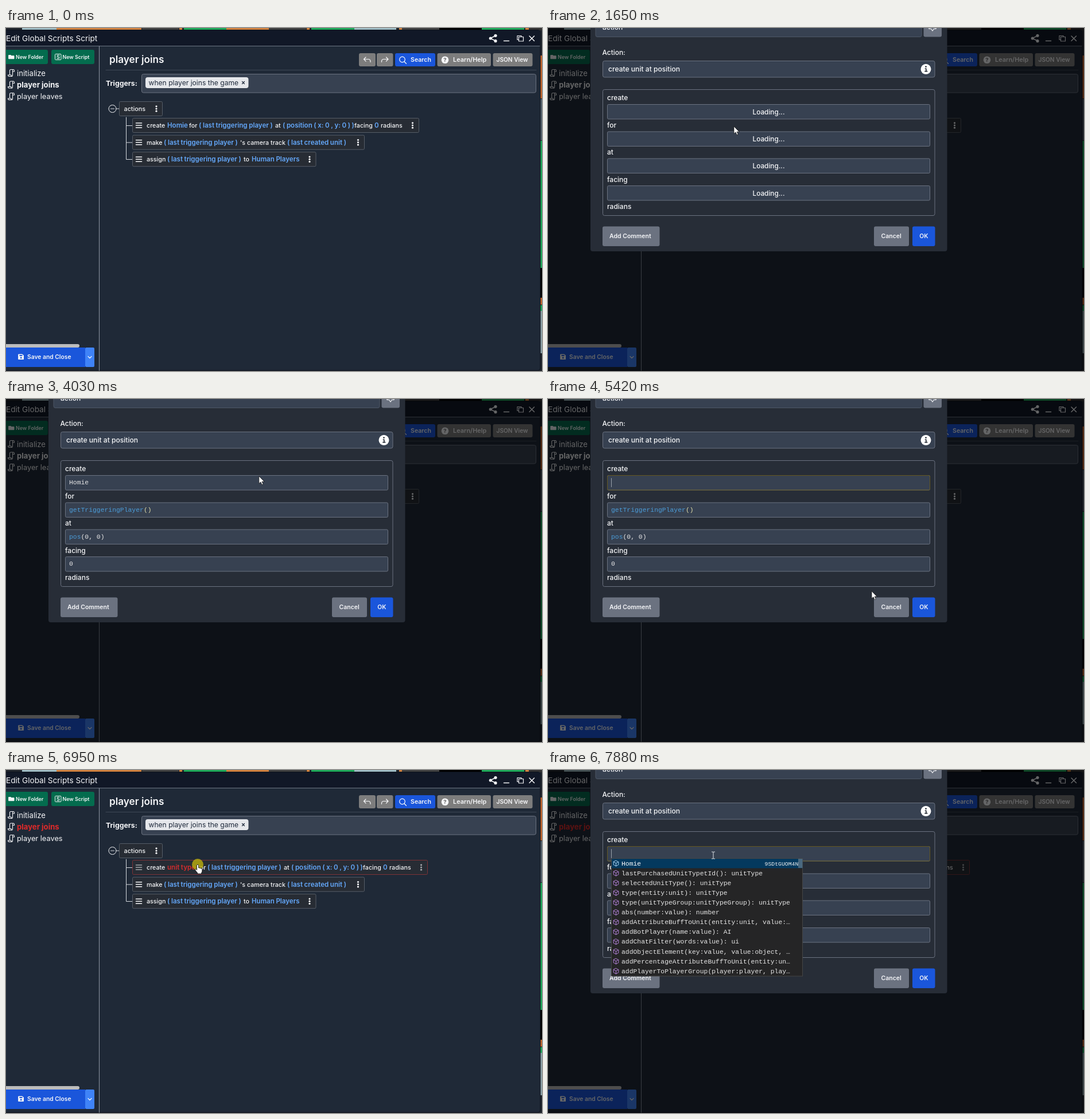
An HTML page that plays this animation: 934x599 px, repeating every 8000 ms.

```html
<!DOCTYPE html>
<html lang="en">
<head>
<meta charset="utf-8">
<title>Script editor</title>
<style>
html, body { margin: 0; width: 100%; height: 100%; overflow: hidden; background: #10151d; }
svg { display: block; width: 934px; height: 599px; }
text { font-family: Inter, Roboto, sans-serif; }
.mono { font-family: "Liberation Mono", "DejaVu Sans Mono", monospace; }
.value { word-spacing: -.3px; }
</style>
</head>
<body>
<svg id="stage" viewBox="0 0 934 599" xmlns="http://www.w3.org/2000/svg"></svg>
<script>
const LOOP = 8000;
const WHITE = '#f5f6f8', BLUE = '#1a56db', GREEN = '#046c4e', GRAY = '#7d7d7d';
const FIELD = '#374151', EDGE = '#6b7280', LINK = '#64a8fb', RED = '#e02a2a';

const rect = (x, y, w, h, fill, stroke = 'none', r = 0) =>
  `<rect x="${x}" y="${y}" width="${w}" height="${h}" rx="${r}" fill="${fill}" stroke="${stroke}"/>`;
const text = (x, y, s, size, weight = 500, fill = WHITE, extra = '') =>
  `<text x="${x}" y="${y}" font-size="${size}" font-weight="${weight}" fill="${fill}" ${extra}>${s}</text>`;
const mono = (x, y, s, fill = '#e6e6e6', size = 11.4) => text(x, y, s, size, 400, fill, 'class="mono"');
const line = (d, stroke = WHITE, width = 1.3, fill = 'none') =>
  `<path d="${d}" fill="${fill}" stroke="${stroke}" stroke-width="${width}" stroke-linecap="round" stroke-linejoin="round"/>`;
const dot = (x, y, r, fill = WHITE) => `<circle cx="${x}" cy="${y}" r="${r}" fill="${fill}"/>`;
const group = (id, body, attrs = '') => `<g id="${id}" ${attrs}>${body}</g>`;
const plain = (x, y, s) => text(x, y, s, 10.7);
const value = (x, y, s, fill = LINK) => text(x, y, s, 11.55, 600, fill, 'class="value"');
const dots = (x, y) => [-4.2, 0, 4.2].map(d => dot(x, y + d, 1.6)).join('');
const burger = y => line([-4, 0, 4].map(d => `M226.5 ${y + d}h10`).join(''), WHITE, 1.6);

function backdrop() {
  const top = [[28, 60, '#9fbcc4'], [88, 148, '#d0813f'], [237, 64, '#414141'], [302, 5, '#d0813f'],
    [310, 74, '#1fa85a'], [384, 74, '#d0813f'], [458, 65, '#414141'], [524, 5, '#d0813f'],
    [532, 75, '#1fa85a'], [607, 73, '#9fbcc4'], [685, 5, '#d0813f'], [690, 65, '#414141'],
    [755, 74, '#000'], [829, 74, '#1fa85a'], [905, 6, '#d0813f'], [911, 23, '#333']];
  const side = [[48, 75, '#c0652c'], [124, 72, '#53606a'], [197, 222, '#1fa85a'], [419, 52, '#000'],
    [471, 12, '#c0652c'], [484, 10, '#1fa85a'], [494, 74, '#8ca0a6']];
  return rect(0, 0, 934, 599, '#20252c')
    + top.map(([x, w, c]) => rect(x, 0, w, 4, c)).join('')
    + side.map(([y, h, c]) => rect(931, y, 3, h, c)).join('');
}

function header() {
  return rect(-6, 3.5, 937, 594.5, '#1f2937', '#0c121c', 4)
    + rect(0, 4, 930, 27, '#111827') + line('M0 31.5H930', '#6d7683', 1)
    + text(0, 22.8, 'Edit Global Scripts Script', 13.6, 400)
    + line('M853 13.5L844 18L853 22.5', WHITE, 1.4)
    + dot(853, 13.3, 2.6) + dot(844.3, 18, 2.6) + dot(853, 22.7, 2.6)
    + line('M867.5 22.5h9', WHITE, 1.5)
    + line('M893 20.5h-2v-7h7v2M893.5 15.5h8v7.5h-8z', WHITE, 1.2)
    + line('M912 14l8.5 8.5M920.5 14L912 22.5', WHITE, 1.5);
}

const scroll = y => line(`M6.5 ${y + 3}v-7.5q0-2 2-2h4.5q1.5 0 1.5 2v1.5h-3v6q0 2.5-2 2.5h-4q-2 0-2-2.5h5.5q0 2.5 1.5 2.5M11.5 ${y - 3}v-1.5q0-2 1.5-2`, WHITE, 1.1);

function sidebar() {
  return line('M162.5 32V598', '#8d96a3', 1)
    + rect(-5, 38, 78, 25, GREEN, 'none', 3) + rect(79, 38, 75, 25, GREEN, 'none', 3)
    + line('M5 47.5h3.5l1 1.2h4.5v5h-9z', WHITE, 1, WHITE) + text(17, 53.6, 'New Folder', 8.85, 600)
    + rect(85.5, 45.5, 10.5, 10, 'none', WHITE, 1) + text(88, 53.7, 'S', 9, 600)
    + text(98.5, 53.6, 'New Script', 8.85, 600)
    + [79, 99.5, 120].map(scroll).join('')
    + text(19, 84, 'initialize', 13.1, 400)
    + text(19, 104.3, 'player joins', 13.1, 700, WHITE, 'id="current"')
    + text(19, 124.3, 'player leaves', 12.8, 400)
    + rect(-4, 552, 132, 6, '#bcbcbc', 'none', 3)
    + rect(-4, 558, 142, 34, BLUE) + rect(138, 558, 16, 34, '#3f83f8', 'none', 2)
    + line('M22 570h6.5l2 2v6.5h-8.5z', WHITE, 1, WHITE) + rect(23.5, 571, 5, 2, BLUE) + dot(26.2, 576, 1.4, BLUE)
    + text(37, 578.3, 'Save and Close', 10.3, 600)
    + line('M143 573.5l3 3 3-3', WHITE, 1.2);
}

function toolbar() {
  return text(180, 60.8, 'player joins', 17.2, 600)
    + rect(615, 44, 29, 23, GRAY, 'none', 3) + rect(646, 44, 28.5, 23, GRAY, 'none', 3)
    + line('M627 51l-3.5 3.5 3.5 3.5M623.5 54.5h8q3.5 0 3.5 4v1', WHITE, 1.2)
    + line('M662.5 51l3.5 3.5-3.5 3.5M666 54.5h-8q-3.5 0-3.5 4v1', WHITE, 1.2)
    + rect(678, 44, 70, 23, BLUE, 'none', 3)
    + '<circle cx="690.5" cy="55" r="4.8" fill="none" stroke="#fff" stroke-width="1.2"/>'
    + line('M694 58.8l3.5 3.5', WHITE, 1.3) + text(705, 59.4, 'Search', 10.6, 600)
    + rect(751.5, 44, 93.5, 23, GRAY, 'none', 3) + dot(765, 55.8, 6.3)
    + text(762.2, 59.4, '?', 9.5, 700, '#666') + text(779, 59.4, 'Learn/Help', 10.9, 600)
    + rect(848.5, 44, 69, 23, GRAY, 'none', 3) + text(854.5, 59.2, 'JSON View', 10.2, 600)
    + line('M174 73.5H924', '#3f4856', 1)
    + text(174, 101.2, 'Triggers:', 12.3, 700)
    + rect(236.5, 80.5, 687, 32.5, FIELD, EDGE, 3) + rect(243, 86, 179.5, 19, '#e5e7eb', 'none', 4)
    + text(248.5, 99.8, 'when player joins the game', 12.1, 400, '#1e293b')
    + line('M411.5 93.5l4 4M415.5 93.5l-4 4', '#1e293b', 1.2);
}

const box = (y, right, stroke = '#565d67') => rect(220.5, y - 12.5, right - 220.5, 25, '#272c34', stroke, 2);

function createRow(type, shift, color, border) {
  const at = x => x + shift, y = 174;
  return box(170, 719.5 + shift, border)
    + `<g opacity="${shift ? .6 : 1}">${burger(170)}${dots(at(708.5), 170)}</g>`
    + plain(245, y, 'create') + value(281, y, type, color) + plain(at(319), y, 'for')
    + value(at(336), y, '( last triggering player )') + plain(at(469), y, 'at')
    + value(at(482), y, '( position ( x: 0 , y: 0 ) )') + plain(at(607), y, 'facing')
    + value(at(642), y, '0') + plain(at(653), y, 'radians');
}

function actions() {
  return '<circle cx="185.5" cy="141" r="6.5" fill="none" stroke="#f5f6f8"/>'
    + line('M182.5 141h6M192 141h5M209.5 156V229.5H220M209.5 170.5H220M209.5 200H220', '#d5d8dd', 1)
    + rect(197.5, 128.5, 75, 25, '#272c34', '#565d67', 2)
    + text(205.5, 144.8, 'actions', 10.8) + dots(262, 141)
    + group('valid', createRow('Homie', 0, LINK))
    + group('invalid', createRow('unit type', 15, '#d42c2e', '#7d3337'))
    + box(199.7, 624.5) + burger(199.7) + dots(613.5, 199.7)
    + plain(245, 203.6, 'make') + value(275, 203.6, '( last triggering player )')
    + plain(408, 203.6, "'s camera track") + value(490, 203.6, '( last created unit )')
    + box(229.2, 540) + burger(229.2) + dots(529, 229.2)
    + plain(245, 233.2, 'assign') + value(281, 233.2, '( last triggering player )')
    + plain(414, 233.2, 'to') + value(428, 233.2, 'Human Players');
}

function popup() {
  const items = ['Homie', 'lastPurchasedUnitTypetId(): unitType', 'selectedUnitType(): unitType',
    'type(entity:unit): unitType', 'type(unitTypeGroup:unitTypeGroup): unitType', 'abs(number:value): number',
    'addAttributeBuffToUnit(entity:unit, value:…', 'addBotPlayer(name:value): AI',
    'addChatFilter(words:value): ui', 'addObjectElement(key:value, value:object, …',
    'addPercentageAttributeBuffToUnit(entity:un…', 'addPlayerToPlayerGroup(player:player, play…'];
  const cube = (y, c) => line(`M118.5 ${y - 4.7}l4.3 2.2v5l-4.3 2.3-4.3-2.3v-5zM114.2 ${y - 2.5}l4.3 2.2 4.3-2.2M118.5 ${y - .3}v5`, c, 1);
  return rect(110.5, 154.5, 333, 205.5, '#252526', '#454545')
    + rect(111, 155, 332, 16.5, '#04395e') + rect(436, 155, 7.5, 16, '#49687f')
    + items.map((s, i) => cube(163 + i * 17.1, i ? '#b180d7' : '#a9d3f5')
      + mono(128, 166.6 + i * 17.1, s, i ? '#e6e6e6' : '#fff')).join('')
    + mono(377.5, 166.6, '9SDtGUOM4N', '#f0f0f0', 9.8);
}

function modal() {
  const fields = [133.5, 181, 228, 275.5];
  const labels = ['create', 'for', 'at', 'facing', 'radians'];
  return rect(0, 0, 934, 599, 'rgba(0,0,0,.59)')
    + rect(74, -6, 621.5, 396, '#272d37', 'none', 4)
    + rect(83, -20, 568, 35.5, FIELD, '#4d5665', 3) + text(95, 3.2, 'action', 12)
    + rect(654.5, -20, 31.5, 35.5, '#6b7280', 'none', 3) + line('M664 -3v4.5h3.5l2.5 3.5 2.5-3.5h3.5V-3', WHITE, 1.2)
    + text(94.5, 47.3, 'Action:', 11.9)
    + rect(95.5, 57.5, 578.5, 28.5, FIELD, EDGE, 3) + text(105, 76.2, 'create unit at position', 12.1)
    + dot(658.5, 71.8, 9, '#fff') + dot(658.5, 67.6, 1.4, '#272d37') + line('M657.3 71h1.6v4.5M656.8 75.6h4', '#272d37', 1.6)
    + rect(95.5, 107.5, 578.5, 220, 'none', EDGE, 3)
    + labels.map((s, i) => text(103, 126.4 + i * 47.45, s, 12)).join('')
    + fields.map((y, i) => rect(103.5, y, 562, 25.5, FIELD, EDGE, 2)).join('')
    + group('loading', fields.map(y => text(384.5, y + 17.3, 'Loading...', 11.8, 500, WHITE, 'text-anchor="middle"')).join(''))
    + group('focus', rect(103.5, 133.5, 562, 25.5, 'none', '#63571f', 2))
    + group('code', rect(110, 138, 0, 16, '#264f78').replace('<rect', '<rect id="selection"')
      + group('homie', mono(110, 149.3, 'Homie'))
      + mono(110, 196.7, 'getTriggeringPlayer<tspan fill="#dfdca8">()</tspan>', '#4b9cd8')
      + mono(110, 244, 'pos<tspan fill="#e6e6e6">(0, 0)</tspan>', '#4b9cd8')
      + mono(110, 291.3, '0'))
    + group('caret', line('M110.5 138.5V153.5', '#9aa1ab', 1))
    + rect(95, 346.5, 99.5, 34.5, '#6b7280', 'none', 3) + text(107, 367, 'Add Comment', 10.5, 600)
    + rect(568, 346.5, 61, 34.5, '#6b7280', 'none', 3) + text(580.5, 367, 'Cancel', 10.5, 600)
    + rect(635, 346.5, 39.5, 34.5, BLUE, 'none', 3) + text(647.3, 367, 'OK', 10.3, 600)
    + group('popup', popup());
}

function pointer() {
  return group('press', dot(0, 0, 10, '#b5a80f'), 'opacity=".85"')
    + group('arrow', line('M0 0V12.5L3 9.9 5.1 14.6 7.2 13.7 5.2 9.2H9Z', '#111', .7, '#fff'))
    + group('hand', line('M-1.6 1.2q1.6-2.4 3.2 0V6q1.3-.9 2.2.4 1.4-.7 2.1.5 1.9-.4 2 1.4v3.2q-.2 2-1.4 3.2V16.2H-.2V15Q-2.6 12.2-4.6 9.2-4.2 7.2-1.6 9.2Z', '#111', .9, '#fff'))
    + group('beam', line('M-2.5 -6h2l.5.6.5-.6h2M0 -5.4V5.4M-2.5 6h2l.5-.6.5.6h2', '#dfe3e8', 1));
}

document.getElementById('stage').innerHTML =
  backdrop() + header() + sidebar() + toolbar() + actions() + group('modal', modal()) + group('pointer', pointer());

// Pointer path: time, x, y
const path = [[0, 897, 625], [119, 897, 625], [120, 895, 588], [350, 770, 450], [600, 480, 290], [780, 300, 195],
  [850, 262, 178], [920, 276, 173], [990, 276, 173], [1150, 300, 168], [1320, 324, 172],
  [2240, 324, 172], [2450, 410, 152], [2710, 534, 88], [2900, 562, 40], [3100, 569, 18], [3170, 569, 16],
  [3430, 569, 16], [3640, 577, 5], [3800, 535, 60], [4030, 441, 135], [4300, 402, 137], [4400, 385, 146],
  [4600, 220, 147], [4800, 65, 147], [4920, 68, 148], [5160, 330, 253], [5450, 590, 345], [5680, 653.5, 369.5],
  [6010, 653.5, 369.5], [6200, 520, 290], [6400, 340, 182], [6490, 307, 164], [6610, 334, 165],
  [7280, 334, 165], [7450, 304, 152], [7610, 288, 149], [8000, 288, 149]];

// Spans of time in which each part is visible
const spans = {
  modal: [[1650, 5820], [7080, LOOP]],
  loading: [[1650, 1720], [7080, 7150]],
  code: [[1720, 5820], [7150, LOOP]],
  homie: [[0, 4950]],
  selection: [[4400, 4950]],
  focus: [[4370, 5620], [7750, LOOP]],
  caret: [[4950, 5620], [7750, LOOP]],
  popup: [[7880, LOOP]],
  valid: [[0, 5820]],
  invalid: [[5820, LOOP]],
  press: [[1520, 1650], [4370, 4830], [5680, 5820], [6950, 7080], [7750, 7820]],
  hand: [[770, 1650], [6400, 7080]],
  beam: [[4340, 4960], [7500, LOOP]]
};
const parts = Object.fromEntries([...Object.keys(spans), 'arrow', 'pointer', 'current'].map(id => [id, document.getElementById(id)]));
const within = (id, t) => spans[id].some(([a, b]) => t >= a && t < b);
const show = (id, on) => { parts[id].style.display = on ? '' : 'none'; };

function locate(t) {
  const i = path.findIndex(p => p[0] > t);
  const [t0, x0, y0] = path[i - 1], [t1, x1, y1] = path[i];
  const k = (t - t0) / (t1 - t0);
  return [x0 + (x1 - x0) * k, y0 + (y1 - y0) * k];
}

const start = performance.now();
function render() {
  const t = Math.max(0, performance.now() - start) % LOOP;
  const [x, y] = locate(t);
  for (const id in spans) show(id, within(id, t));
  show('arrow', !within('hand', t) && !within('beam', t));
  parts.pointer.setAttribute('transform', `translate(${x} ${y})`);
  parts.current.setAttribute('fill', t < 5820 ? WHITE : RED);
  const left = Math.min(144, Math.max(110, x));
  parts.selection.setAttribute('x', left);
  parts.selection.setAttribute('width', 144 - left);
  requestAnimationFrame(render);
}
render();
</script>
</body>
</html>
```
